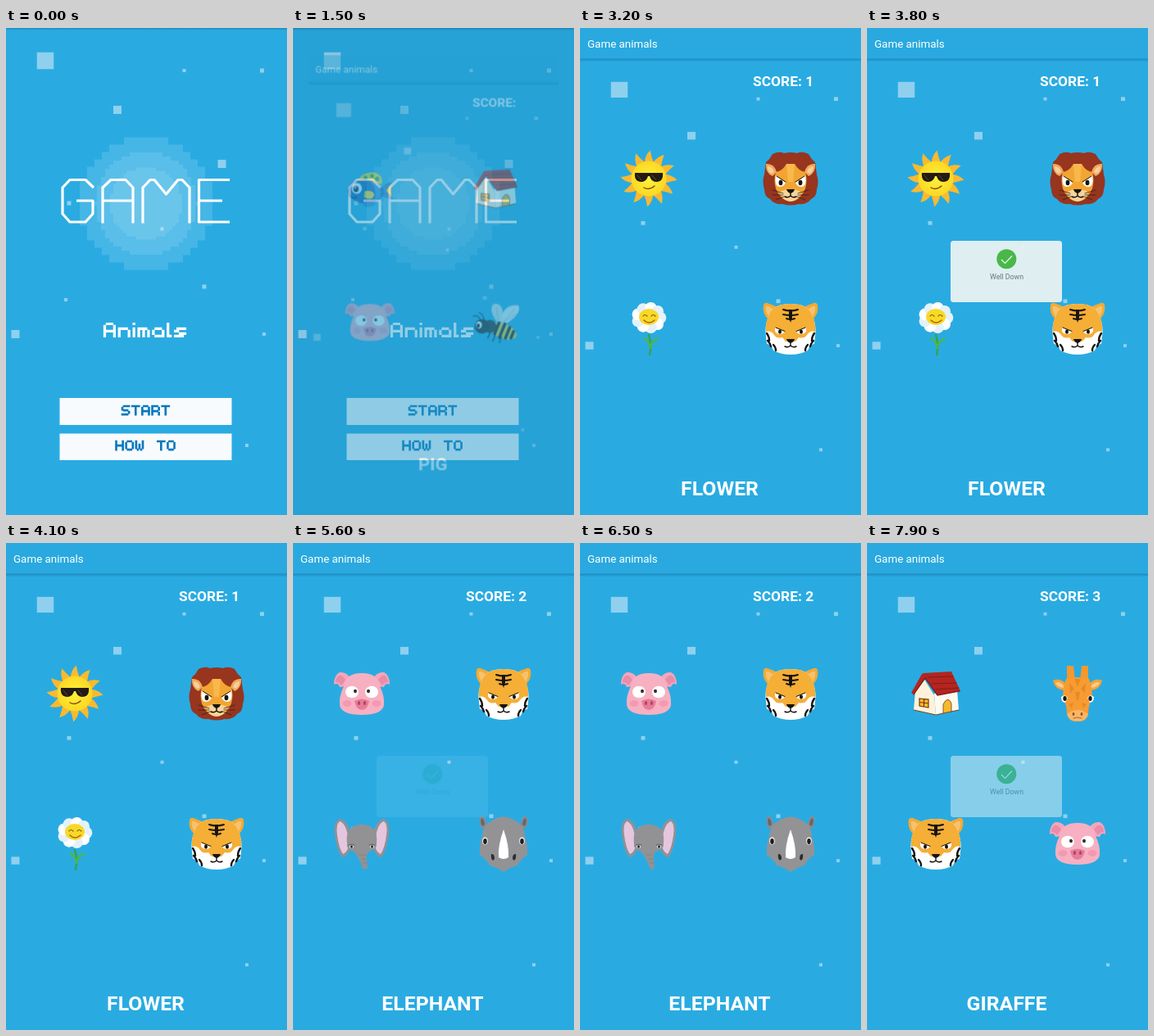
An HTML page for the animation above (8000 ms loop, 343 by 595 pixels).

```html
<!DOCTYPE html>
<html lang="en">
<head>
<meta charset="utf-8">
<title>Game animals</title>
<style>
html, body { margin: 0; width: 100%; height: 100%; overflow: hidden; background: #29abe2; }
svg { display: block; }
#stage { width: 343px; height: 595px; }
text { font-family: Roboto, "Open Sans", sans-serif; fill: #fff; }
.word { font-size: 24.8px; font-weight: 700; text-anchor: middle; }
.score { font-size: 17.4px; font-weight: 700; }
.title { font-size: 13.4px; }
.well { font-size: 8.8px; fill: #66767d; text-anchor: middle; }
.anim { animation: 8s step-end infinite; }
#press { animation-name: press; }
#board { animation-name: board; transform-origin: 171.5px 297.5px; }
#shade { animation-name: shade; }
#toast { animation-name: toast; }
#round1 { animation-name: round1; }
#round2 { animation-name: round2; }
#round3 { animation-name: round3; }
#round4 { animation-name: round4; }
@keyframes press { 0%, 15%, 100% { opacity: 0; } 13.75% { opacity: 1; } }
@keyframes board {
  0% { opacity: 0; transform: scale(.888); }
  18.75% { opacity: .47; transform: scale(.888); }
  20% { opacity: .85; transform: scale(.965); }
  21.25% { opacity: 1; transform: scale(.992); }
  22.5%, 100% { opacity: 1; transform: none; }
}
@keyframes shade {
  0%, 22.5%, 100% { opacity: 0; }
  18.75% { opacity: .05; }
  20% { opacity: .03; }
  21.25% { opacity: .01; }
}
@keyframes round1 { 0% { opacity: 1; } 40%, 100% { opacity: 0; } }
@keyframes round2 { 0%, 70%, 100% { opacity: 0; } 40% { opacity: 1; } }
@keyframes round3 { 0%, 97.5%, 100% { opacity: 0; } 70% { opacity: 1; } }
@keyframes round4 { 0% { opacity: 0; } 97.5%, 100% { opacity: 1; } }
@keyframes toast {
  0%, 40% { opacity: 0; }
  41.25% { opacity: .35; } 42.5% { opacity: .68; } 43.75% { opacity: .9; } 45% { opacity: 1; }
  47.5% { opacity: .97; } 48.75% { opacity: .65; } 50% { opacity: .28; } 51.25% { opacity: 0; }
  70% { opacity: .08; } 71.25% { opacity: .5; } 72.5% { opacity: .76; } 73.75% { opacity: .93; } 75% { opacity: 1; }
  77.5% { opacity: .97; } 78.75% { opacity: .65; } 80% { opacity: .28; } 81.25% { opacity: 0; }
  97.5% { opacity: .08; } 98.75%, 100% { opacity: .5; }
}
</style>
</head>
<body>
<svg id="stage" viewBox="0 0 343 595">
  <defs>
    <linearGradient id="drop" x2="0" y2="1">
      <stop stop-color="#0b5c8a" stop-opacity=".42"/>
      <stop offset="1" stop-color="#0b5c8a" stop-opacity="0"/>
    </linearGradient>
    <radialGradient id="sunFace">
      <stop stop-color="#fff23a"/><stop offset="1" stop-color="#fbd824"/>
    </radialGradient>
  </defs>

  <g id="home">
    <rect width="343" height="595" fill="#29abe2"/>
    <rect width="343" height="3" fill="url(#drop)"/>
    <g id="discs" fill="#fff"></g>
    <g class="dots"></g>
    <g id="logo" role="img" aria-label="GAME" fill="none" stroke="#fff" stroke-width="3.2" stroke-linejoin="round">
      <path d="M107 195L97 185.500H78L69 195V227L78 237H97L106 227V211H86"/>
      <path d="M118 238.500V195L128 185.500H146L155 195V238.500M118 211H155"/>
      <path d="M167 238.500V195L176 185.500H181L195.500 203L210 185.500H215L224 195V238.500"/>
      <path d="M273 185.500H235.500V237H273M235.500 211H264"/>
    </g>
    <g fill="#f8fbfe">
      <rect x="65.500" y="452" width="210" height="33"/>
      <rect x="65.500" y="495.500" width="210" height="32.500"/>
    </g>
    <rect id="press" class="anim" x="65.500" y="452" width="210" height="33" fill="#c9e6f5"/>
    <g id="labels"></g>
  </g>

  <g id="board" class="anim">
    <rect width="343" height="595" fill="#29abe2"/>
    <g class="dots" transform="translate(0 38) scale(1 .936)"></g>
    <rect width="343" height="38" fill="#29a9df"/>
    <rect y="37.500" width="343" height="4" fill="url(#drop)"/>
    <text class="title" x="9" y="24">Game animals</text>
    <g id="round1" class="anim"></g>
    <g id="round2" class="anim"></g>
    <g id="round3" class="anim"></g>
    <g id="round4" class="anim"></g>
  </g>
  <rect id="shade" class="anim" width="343" height="595"/>

  <g id="toast" class="anim">
    <rect x="102" y="260" width="136" height="75" rx="3.500" fill="#f0f5f3" fill-opacity=".95"/>
    <circle cx="170.300" cy="282.300" r="12" fill="#4bb944"/>
    <path d="M164 283L168.500 287.500L177 278.500" fill="none" stroke="#fff" stroke-width="1.100"/>
    <text class="well" x="170.500" y="306.700">Well Down</text>
  </g>
</svg>

<script>
const $ = s => document.querySelector(s);
const range = n => [...Array(n).keys()];
const mirror = s => s + `<g transform="scale(-1 1)">${s}</g>`;
const path = (d, fill) => `<path d="${d}" fill="${fill}"/>`;
const line = (d, color, width = 1) =>
  `<path d="${d}" fill="none" stroke="${color}" stroke-width="${width}" stroke-linecap="round"/>`;
const oval = (x, y, rx, ry, fill) => `<ellipse cx="${x}" cy="${y}" rx="${rx}" ry="${ry}" fill="${fill}"/>`;

// Stepped disc built from rows of square cells
function disc(r, cell, alpha) {
  let d = '';
  for (let y = -r; y < r; y += cell) {
    const mid = y + cell / 2;
    const half = Math.round(Math.sqrt(Math.max(0, r * r - mid * mid)) / cell) * cell;
    d += `M${171 - half} ${214.5 + y}h${2 * half}v${cell}h${-2 * half}z`;
  }
  return `<path d="${d}" fill-opacity="${alpha}"/>`;
}
$('#discs').innerHTML = disc(81, 9, .13) + disc(62.5, 5, .11) + disc(44, 4, .1);

// Floating squares: x, y, size
const dots = [[48, 40, 20.5], [217.5, 52, 4], [312.5, 52, 5], [136, 100, 10], [263.5, 166, 10],
  [77, 214, 5], [190.5, 245.5, 4], [242, 316, 5], [73, 332, 4], [11.5, 374, 10], [315, 374, 4], [294, 510, 4]];
document.querySelectorAll('.dots').forEach(g => {
  g.innerHTML = dots.map(([x, y, s]) =>
    `<rect x="${x - s / 2}" y="${y - s / 2}" width="${s}" height="${s}" fill="#e6f0fa" fill-opacity=".54"/>`).join('');
});

// Block letters as strokes on a cell grid: [width in cells, path]
const glyphs = {
  A: [5, 'M0 5V1M1 0H3M4 1V5M0 3H4'],
  n: [5, 'M0 5V2H3M4 3V5'],
  i: [1, 'M0 0h.01M0 2V5'],
  m: [5, 'M0 5V2H3M2 3V5M4 3V5'],
  a: [5, 'M1 2H3M4 3V5H1M0 3V4'],
  l: [2, 'M0 0V5H1'],
  s: [5, 'M1 2H4M0 3H1M2 4H4M0 5H3'],
  S: [5, 'M4 0H1M0 1V2M1 2.500H3M4 3.500V4M0 5H3'],
  T: [5, 'M0 0H4M2 0V5'],
  R: [5, 'M0 5V0H3M4 1V2M0 3H3M4 4V5'],
  H: [5, 'M0 0V5M4 0V5M0 2.500H4'],
  O: [5, 'M1 0H3M4 1V4M3 5H1M0 4V1'],
  W: [5, 'M0 0V4M2 2V4M4 0V4M1 5h.01M3 5h.01'],
  ' ': [6, '']
};
function blocks(text, x, y, cell, color, weight) {
  let col = 0;
  const marks = [...text].map(c => {
    const [w, d] = glyphs[c];
    const mark = `<path transform="translate(${col + .5} .5)" d="${d}"/>`;
    col += w + 1;
    return mark;
  }).join('');
  return `<g role="img" aria-label="${text}" transform="translate(${x} ${y}) scale(${cell})" fill="none"
    stroke="${color}" stroke-width="${weight}" stroke-linecap="square">${marks}</g>`;
}
$('#labels').innerHTML = blocks('Animals', 119, 360, 2.97, '#fff', 1.08) +
  blocks('START', 141, 461, 2.03, '#0878bd', 1.3) +
  blocks('HOW TO', 133.5, 504, 2.03, '#0878bd', 1.3);

const polar = (r, a) => `${(r * Math.cos(a)).toFixed(1)} ${(r * Math.sin(a)).toFixed(1)}`;
const rays = 'M' + range(12).map(i => {
  const a = i * Math.PI / 6 - .25;
  return `${polar(21, a)}Q${polar(29, a + .1)} ${polar(34.5, a + .3)}Q${polar(27, a + .36)} ${polar(21, a + .52)}`;
}).join('L') + 'Z';
const petals = range(9).map(i => {
  const a = i * 2 * Math.PI / 9;
  return oval(14 * Math.cos(a), -13 + 12 * Math.sin(a), 7.3, 7.3, i % 2 ? '#fff' : '#e3f2fa');
}).join('');
const angryEye = mirror(path('M7 4L19 -1Q20 7 13 7Q9 7 7 4Z', '#fff') +
  oval(13, 4, 2, 2.7, '#171411') + line('M7 3.500L18 -1', '#171411', 1));
const whiskers = mirror(line('M9 18L22 14M9 20L22 20M8 22L18 26', '#2c211c', .8));
const nose = path('M-5 13H5Q4 17 0 18Q-4 17 -5 13Z', '#171411') +
  line('M0 17V21Q-3 24 -7 22M0 21Q3 24 7 22', '#171411', 1.4);

const art = {
  sun: path(rays, '#f9b930') + oval(0, 0, 21.5, 21.5, 'url(#sunFace)') +
    path('M-17 -7H17Q18 4 9 4Q3 4 1 -3H-1Q-3 4 -9 4Q-18 4 -17 -7Z', '#231a12') +
    line('M-14 -4L-9 2M4 -4L9 2', '#625b51', .8) + line('M-6 11Q0 15 7 9', '#8c4f16', 1.5),

  lion: path('M-22 -30Q-14 -34 -8 -31Q0 -33 8 -31Q14 -34 22 -30Q25 -24 30 -20L32 -5Q35 4 32 13Q32 22 25 25Q20 32 10 31Q0 34 -10 31Q-20 32 -25 25Q-32 22 -32 13Q-35 4 -32 -5L-30 -20Q-25 -24 -22 -30Z', '#97351f') +
    mirror(path('M17 -8Q20 -19 30 -18Q31 -7 22 -3Z', '#f0a95a') + path('M20 -8Q22 -15 28 -15Q28 -8 23 -6Z', '#f7cf9c')) +
    path('M-18 -8Q-10 -9 -5 -18H5Q10 -9 18 -8Q21 2 18 12Q12 27 0 28Q-12 27 -18 12Q-21 2 -18 -8Z', '#f3a532') +
    path('M-5 -18H5L3 4H-3Z', '#f9b84e') +
    path('M-13 17Q-7 12 0 14Q7 12 13 17Q10 27 0 28Q-10 27 -13 17Z', '#f9d49b') +
    mirror(path('M6 5L18 -4Q20 9 14 10Q8 10 6 5Z', '#fff') + oval(12, 5, 2.4, 3.2, '#171411') +
      line('M6 4L17 -3', '#171411', 1)) +
    whiskers + nose,

  tiger: mirror(path('M33 -29Q31 -33 26 -30Q19 -28 16 -25L27 -11Q35 -18 33 -29Z', '#f3aa33') +
      path('M30 -27Q27 -28 21 -23L27 -15Q31 -20 30 -27Z', '#f6c26f')) +
    path('M-27 -15C-23 -27 -12 -30 0 -30S23 -27 27 -15Q32 -2 30 10L29 19L24 20L21 27Q12 32 0 32T-21 27L-24 20L-29 19L-30 10Q-32 -2 -27 -15Z', '#fff') +
    path('M-27 -15C-23 -27 -12 -30 0 -30S23 -27 27 -15Q31 -6 30 4Q24 2 20 8Q17 13 10 11L6 16H-6L-10 11Q-17 13 -20 8Q-24 2 -30 4Q-31 -6 -27 -15Z', '#f5ae36') +
    path('M-2 -23H2V-13L0 -7L-2 -13Z', '#171411') +
    line('M-9 -23Q0 -20 9 -23M-9 -17Q0 -15 9 -17M-5 -12Q0 -10 5 -12', '#171411', 1.9) +
    angryEye +
    mirror(line('M29 6Q26 10 26 15M28 15Q25 18 24 22M21 20Q18 23 18 27', '#171411', 2.4)) + nose,

  flower: line('M0 8Q4 20 1 32', '#35a34a', 2.4) +
    line('M2 24Q0 14 -6 12M3 20Q5 14 11 13', '#4db748', 2.4) +
    petals + oval(0, -14, 12, 10, '#f9d928') +
    line('M-7 -15Q-5 -18 -2 -15M3 -15Q5 -18 8 -15', '#815719', 1.2) +
    line('M-6 -10Q0 -4 7 -10', '#a9601c', 1.4),

  pig: mirror(path('M14 -19Q19 -27 27 -26Q34 -23 34 -11Q29 -14 27 -8Q22 -9 18 -8Z', '#f5a6bb') +
      path('M20 -17Q24 -23 28 -22Q32 -19 32 -14Q27 -14 25 -10Z', '#e98ca8')) +
    path('M0 -25C14 -25 20 -20 22 -9Q28 3 27 14Q25 26 0 26T-27 14Q-28 3 -22 -9C-20 -20 -14 -25 0 -25Z', '#f7b0c1') +
    mirror(oval(12, -2, 8, 7.3, '#fff') + oval(18, 12, 5.5, 4, '#f29ab2')) +
    mirror(oval(8, -3, 2, 2.3, '#3c2930')) +
    path('M-9 9Q0 4 9 9Q7 20 0 20Q-7 20 -9 9Z', '#e77c99') +
    mirror(oval(3.5, 11.5, 1.7, 2.6, '#b24666')),

  elephant: mirror(path('M14 -12Q18 -29 27 -30Q35 -26 33 -12Q31 8 24 17Q17 17 14 5Z', '#919194') +
      path('M17 -9Q20 -25 27 -27Q32 -23 30 -10Q28 6 23 13Q18 11 16 3Z', '#e6c6de')) +
    path('M0 -23C13 -23 20 -15 18 0Q19 7 11 9Q6 10 6 17Q6 23 7 30Q5 33 1 30Q-1 22 -6 15Q-8 10 -13 9Q-19 6 -18 0C-20 -15 -13 -23 0 -23Z', '#929295') +
    mirror(oval(12.5, 4, 2.6, 2, '#e9e9e9') + oval(12.5, 4, 1.5, 1.7, '#252326') + line('M9 2Q12 0 16 2', '#5b5b5e', .9)) +
    line('M-3 14H5M0 19H5M1 24H6', '#818184', .8),

  rhino: mirror(path('M21 -19Q20 -31 27 -34Q32 -29 27 -18Z', '#8b8b8e') + path('M23 -23Q23 -29 27 -31Q29 -27 26 -21Z', '#67676b')) +
    path('M-14 -28Q0 -37 14 -28Q25 -23 26 -9Q30 2 29 14Q20 20 17 27Q8 29 0 35Q-8 29 -17 27Q-20 20 -29 14Q-30 2 -26 -9Q-25 -23 -14 -28Z', '#939396') +
    path('M0 -17Q7 3 6 17Q0 21 -6 17Q-7 3 0 -17Z', '#fff') +
    mirror(oval(22.5, -3, 3.3, 4.6, '#f7f7f7') + oval(22.5, -2.5, 2.3, 3.4, '#1d1b1c') +
      path('M11 19Q11 12 15 13Q16 18 13 21Z', '#302d2f')),

  house: path('M-27 20L-25 -4L-15 -19L-2 2L0 26Z', '#fff2d9') + path('M0 26L-2 0L26 -4L28 20Z', '#fffaf0') +
    path('M-15 -25L19 -27L30 -3L2 2L-13 -18L-27 1L-30 -1L-17 -24Z', '#b3261f') +
    line('M-10 -20L21 -21M-5 -12L25 -13M0 -5L28 -7', '#86191b', 1) +
    line('M-27 1L-13 -19L2 2L29 -3', '#741518', 1.2) +
    path('M-20 6L-9 7V17L-20 15Z', '#f7bd2b') + line('M-20 6L-9 7V17L-20 15ZM-14.500 6.500V16M-20 10.500L-9 12', '#7a3215', 1.2) +
    path('M9 24V13Q15 2 19 12V22Z', '#f3bb2c') + line('M9 24V13Q15 2 19 12V22', '#7a3215', .8) +
    line('M-27 20L0 26L28 20', '#7a4630', 1.1),

  giraffe: mirror(path('M3 -17L5 -34H13V-16Z', '#f4982f') +
      path('M14 -12Q22 -20 30 -16Q28 -5 16 -4Z', '#f6a338') + path('M17 -10Q23 -16 27 -13Q25 -8 17 -7Z', '#fbcb87')) +
    path('M-14 -18Q0 -22 14 -18Q18 -8 18 6Q13 14 13 24Q12 34 0 34T-13 24Q-13 14 -18 6Q-18 -8 -14 -18Z', '#f79c32') +
    path('M-4 -18L0 -8L4 -18ZM-10 -13L-4 -6L-9 0ZM10 -13L4 -6L9 0ZM-3 -2H3L1 8H-1Z', '#e98a27') +
    mirror(path('M12 5Q15 0 20 4Q20 11 15 11Z', '#fff') + oval(15.5, 6, 2.2, 3, '#1d1916') +
      path('M5 11L11 13L7 18Z', '#e68a2a')) +
    path('M-13 25Q0 15 13 25Q11 34 0 34T-13 25Z', '#fab666') +
    mirror(oval(5, 25, 1.4, 1.9, '#925023')) + line('M-5 30Q0 28 5 30', '#b0662a', 1),

  fish: path('M14 2Q21 -9 30 -10Q27 2 32 14Q22 14 13 7Z', '#1676c2') + path('M22 2L31 -8Q26 2 31 12Z', '#f3ce22') +
    path('M-18 -9Q-12 -24 6 -23Q19 -19 16 -7Z', '#f5dd24') +
    oval(-6, -16, 2.5, 2.5, '#39a24b') + oval(3, -18, 2.5, 2.5, '#39a24b') + oval(10, -14, 3, 3, '#39a24b') +
    path('M-31 4C-28 -14 -7 -18 9 -9Q20 -2 18 9Q9 21 -9 20Q-25 18 -31 4Z', '#1563b4') +
    path('M-4 -13Q10 -6 7 15L14 12Q18 0 9 -9Z', '#2a91da') + path('M-7 3Q6 1 6 9Q2 17 -8 11Z', '#f5d623') +
    path('M-12 19Q-4 29 8 21L4 17Z', '#1c86d0') +
    oval(-18, -1, 7, 7.5, '#fff') + oval(-19, 0, 3.6, 4.2, '#11243f') + oval(-20, -2, 1.2, 1.2, '#fff') +
    line('M-29 9Q-24 14 -18 11', '#0b366c', 1.5),

  bee: path('M2 0Q-11 -17 -3 -25Q12 -28 10 -2Z', '#d2e4ea') + path('M7 0Q9 -25 31 -23Q37 -12 12 4Z', '#e3eff3') +
    line('M3 -2L1 -20M10 0L26 -18M10 1L28 -12', '#a6bdc6', .8) +
    `<g transform="rotate(22 7 11)">${oval(10, 11, 20, 10, '#f4cd2e') +
      line('M1 3V19M9 1V21M17 3V19M24 6V16', '#251e19', 4)}</g>` +
    oval(-8, 6, 9, 9, '#352a25') + oval(-19, 6, 10, 10, '#282321') +
    oval(-23, 4, 4, 5, '#fff') + oval(-24, 5, 2, 3, '#181716') + line('M-21 -3Q-25 -11 -31 -8M-16 -3Q-17 -11 -23 -13', '#282321', 1.3) +
    line('M-7 13L-11 22M0 16L-4 26M8 20L5 28', '#282321', 1.5)
};

const spots = [[84, 184], [257, 184], [84, 367], [257, 367]];
const rounds = [
  ['PIG', '', 'fish house pig bee'],
  ['FLOWER', ' 1', 'sun lion flower tiger'],
  ['ELEPHANT', ' 2', 'pig tiger elephant rhino'],
  ['GIRAFFE', ' 3', 'house giraffe tiger pig']
];
rounds.forEach(([word, points, names], i) => {
  $('#round' + (i + 1)).innerHTML =
    `<text class="score" x="${points ? 211 : 225}" y="71.200">SCORE:${points}</text>` +
    `<text class="word" x="170.500" y="571.300">${word}</text>` +
    names.split(' ').map((name, k) => `<g transform="translate(${spots[k]})">${art[name]}</g>`).join('');
});
</script>
</body>
</html>
```
